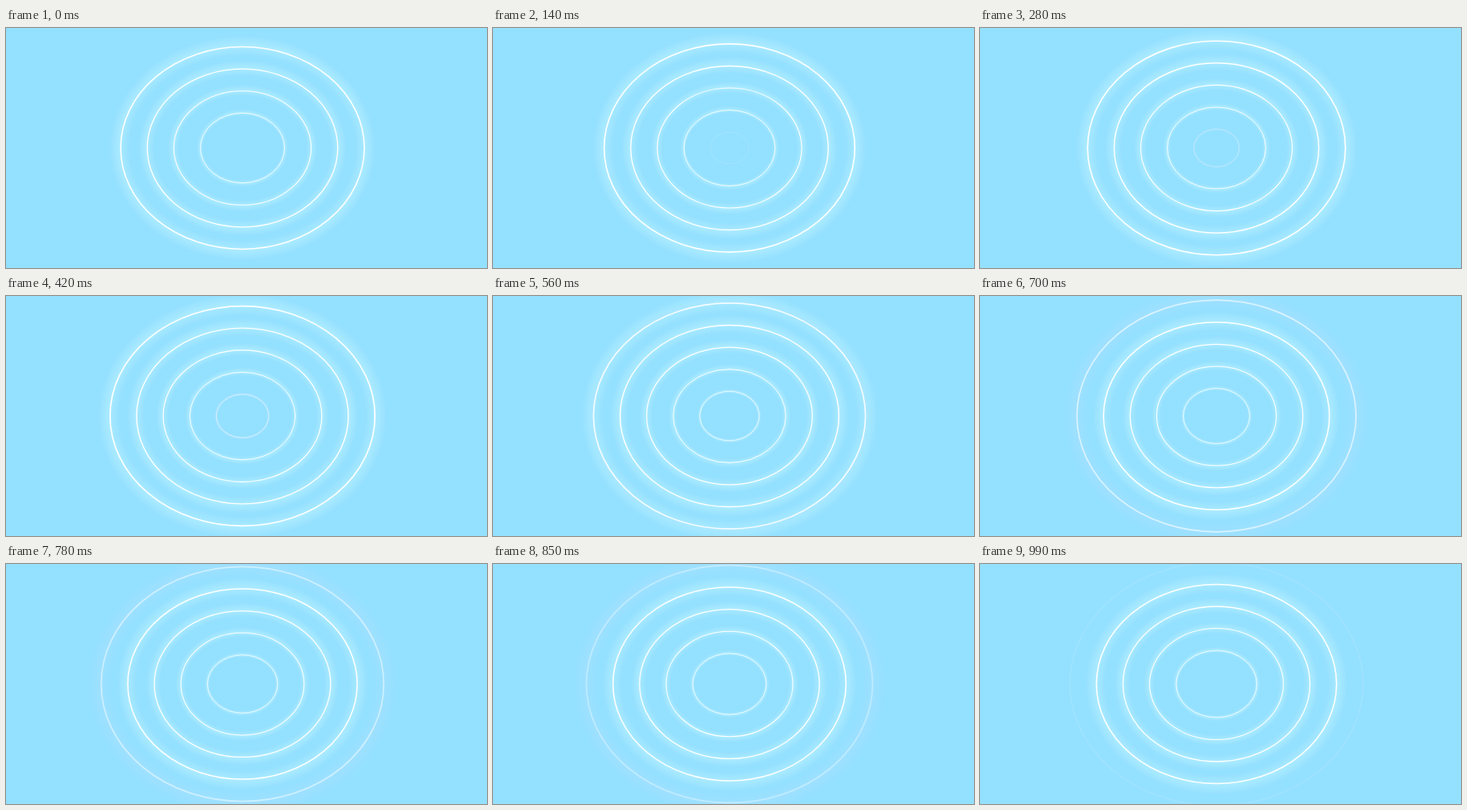
These frames come from a looping animation (600 by 300 pixels, 1.06 s). An HTML page with a canvas:

```html
<!DOCTYPE html>
<html lang="en">
<head>
<meta charset="utf-8">
<title>Ripples</title>
<style>
  html, body { margin: 0; width: 100%; height: 100%; overflow: hidden; background: #94e0ff; }
  canvas { display: block; }
</style>
</head>
<body>
<canvas id="stage" width="600" height="300"></canvas>
<script>
const ctx = document.getElementById('stage').getContext('2d');
const LOOP = 1060, STEPS = 15;
const CX = 295, CY = 150, RATIO = 0.832;
const GAP = 33.15, START = 19.35;
const FADE_IN = 20, FADE_OUT = 184.5, FADE = 17;

const clamp = v => Math.max(0, Math.min(1, v));

// Steps last 70 ms, the one at 700 ms lasts 80 ms.
function stepAt(t) {
  return Math.floor((t < 770 ? t : t - 10) / 70);
}

function strokeRing(rx, ry, width, alpha) {
  ctx.lineWidth = width;
  ctx.strokeStyle = `rgba(255,255,255,${alpha})`;
  ctx.beginPath();
  ctx.ellipse(CX, CY, rx, ry, 0, 0, Math.PI * 2);
  ctx.stroke();
}

function drawRing(rx) {
  const alpha = Math.min(clamp((rx - FADE_IN) / FADE), clamp((FADE_OUT - rx) / FADE));
  if (!alpha) return;
  const ry = rx * RATIO, scale = rx / 150;
  // Soft halo built from widening strokes
  for (let i = 1; i <= 10; i++) {
    const shift = 1.5 * scale;
    strokeRing(rx + shift, ry + shift, i * 2.4 * scale, alpha * 0.022);
  }
  strokeRing(rx, ry, 0.45 + rx * 0.0075, alpha);
}

function draw(t) {
  const grow = GAP * stepAt(t) / STEPS;
  ctx.fillStyle = '#94e0ff';
  ctx.fillRect(0, 0, 600, 300);
  for (let k = 0; k < 5; k++) drawRing(START + k * GAP + grow);
}

const begin = performance.now();
function tick() {
  draw((performance.now() - begin) % LOOP);
  requestAnimationFrame(tick);
}
tick();
</script>
</body>
</html>
```
